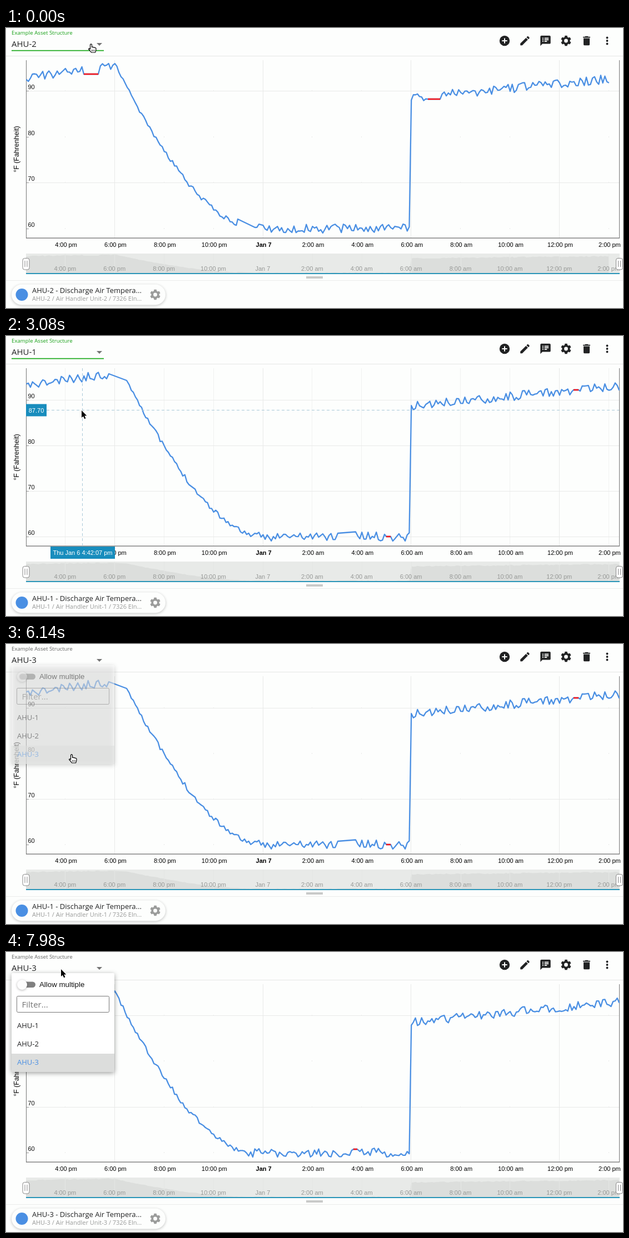
Animation, 1110 px wide and 504 px high, one loop 8000 ms. Source, as an HTML page with a canvas:

```html
<!DOCTYPE html>
<html>
<head>
<meta charset="utf-8">
<style>
html, body { margin: 0; width: 100%; height: 100%; overflow: hidden; background: #fdfefd; }
canvas { display: block; }
</style>
</head>
<body>
<canvas id="stage" width="1110" height="504"></canvas>
<script>
const ctx = document.getElementById('stage').getContext('2d');
const LOOP = 8000, STEP = 90;
const LEFT = 36, RIGHT = 1103, X4PM = 106.3, HOUR = 44.45, MORNING = 727;
const PAPER = '#fdfefd', BLUE = '#4a8fe3', TEAL = '#188dbd', INK = '#212223', GRID = '#e9eae9';
const SANS = 'px "Open Sans", sans-serif', ARIAL = 'px "Liberation Sans", Arial, sans-serif';

// Flats are straight stretches without samples: [x0, x1, y0, y1]; level ones are red
const UNITS = {
  1: { top: 114.5, end: RIGHT, dusk: 213, seed: 11,
    flats: [[185, 217, 68, 80], [597, 629, 355, 352.5], [684, 692, 361, 361], [1021, 1030, 97, 97]] },
  2: { top: 113, end: 1085, dusk: 199, seed: 5,
    flats: [[140, 166, 83, 83], [417, 448, 344, 359], [759, 781, 128, 128]] },
  3: { top: 114, end: RIGHT, dusk: 195, seed: 23,
    flats: [[36.5, 54, 97, 97], [625, 632, 355, 355]] }
};

// Warm day, cool-down after dusk, level night, sudden warm-up in the morning
function trend(x, dusk) {
  if (x >= MORNING) return 126 - 36 * (x - MORNING) / (RIGHT - MORNING);
  if (x < dusk) return Math.max(69, 90 - 22 * (x - LEFT) / 150);
  return 361 - 292 * Math.max(0, 1 - (x - dusk) / 245) ** 1.7;
}

// One sample every five minutes
function buildLine({ end, dusk, seed, flats }) {
  const rand = () => (seed = seed * 16807 % 2147483647) / 2147483647;
  for (let i = 0; i < 9; i++) rand();
  const pts = flats.flatMap(([a, b, y0, y1]) => [[a, y0], [b, y1]]);
  for (let x = LEFT + .5; x <= end + .5; x += HOUR / 12) {
    const noise = (rand() * 2 - 1) * (x > dusk && x < dusk + 240 ? 4.5 : 8);
    if (!flats.some(f => x > f[0] - 2 && x < f[1] + 2)) pts.push([x, trend(x, dusk) + noise]);
  }
  return pts.sort((p, q) => p[0] - q[0]);
}
for (const u of Object.values(UNITS)) u.pts = buildLine(u);

const TICKS = Array.from({ length: 12 }, (_, i) => {
  const h = (16 + i * 2) % 24;
  return {
    x: X4PM + i * 2 * HOUR,
    label: h ? `${h % 12 || 12}:00 ${h < 12 ? 'am' : 'pm'}` : 'Jan 7',
    bold: h ? '' : 'bold ',
    major: i % 3 == 1
  };
});

function rect(x, y, w, h, color) {
  ctx.fillStyle = color;
  ctx.fillRect(x, y, w, h);
}

function text(str, x, y, font, color, align = 'left') {
  ctx.font = font;
  ctx.fillStyle = color;
  ctx.textAlign = align;
  ctx.fillText(str, x, y);
}

function dot(x, y, r, color) {
  ctx.beginPath();
  ctx.arc(x, y, r, 0, 7);
  ctx.fillStyle = color;
  ctx.fill();
}

function pill(x, y, w, h, r, { fill, edge, shadow = 0, shade = .3 }) {
  ctx.save();
  ctx.beginPath();
  ctx.roundRect(x, y, w, h, r);
  ctx.shadowColor = `rgba(0,0,0,${shade})`;
  ctx.shadowBlur = shadow;
  ctx.shadowOffsetY = shadow / 4;
  if (fill) { ctx.fillStyle = fill; ctx.fill(); }
  if (edge) { ctx.strokeStyle = edge; ctx.lineWidth = 1; ctx.stroke(); }
  ctx.restore();
}

function trace(pts) {
  ctx.beginPath();
  for (const [x, y] of pts) ctx.lineTo(x, y);
}

function stroke(pts, color, width) {
  trace(pts);
  ctx.strokeStyle = color;
  ctx.lineWidth = width;
  ctx.stroke();
}

function icon(path, x, y) {
  ctx.save();
  ctx.translate(x - 11, y - 11);
  ctx.scale(.92, .92);
  ctx.fillStyle = INK;
  ctx.fill(new Path2D(path));
  ctx.restore();
}

function gear(x, y, r, color) {
  const pts = [];
  for (let k = 0; k < 6; k++)
    for (const d of [-.36, -.23, .23, .36]) {
      const a = (k / 3 - .5) * Math.PI + d, m = Math.abs(d) > .3 ? r * .76 : r;
      pts.push([x + m * Math.cos(a), y + m * Math.sin(a)]);
    }
  trace(pts);
  ctx.closePath();
  ctx.moveTo(x + r * .36, y);
  ctx.arc(x, y, r * .36, 0, 7);
  ctx.fillStyle = color;
  ctx.fill('evenodd');
}

function drawTools() {
  dot(897, 23, 9.2, INK);
  rect(892.4, 22, 9.2, 2, PAPER);
  rect(896, 18.4, 2, 9.2, PAPER);
  icon('M3 17.2V21H6.8L17.8 9.9L14.1 6.2ZM20.7 7Q21.4 6.3 20.7 5.6L18.4 3.3Q17.7 2.6 17 3.3L15.1 5.1L18.9 8.9Z', 933.5, 23);
  icon('M4 2H20Q22 2 22 4V16Q22 18 20 18H6L2 22V4Q2 2 4 2Z', 970.5, 23);
  for (let i = 0; i < 3; i++) {
    rect(965, 17.5 + i * 2.8, 1.8, 1.8, PAPER);
    rect(968.7, 17.5 + i * 2.8, i < 2 ? 7.4 : 4.6, 1.8, PAPER);
  }
  gear(1007.5, 23, 9.4, INK);
  icon('M6 7H18V19Q18 21 16 21H8Q6 21 6 19ZM5 4H8.5L9.5 3H14.5L15.5 4H19V6H5Z', 1044.5, 23);
  for (const y of [17.5, 23, 28.5]) dot(1081.5, y, 1.9, INK);
}

function drawHeader(unit, open) {
  text('Example Asset Structure', 10, 12, 9.7 + SANS, open ? '#666' : '#18a018');
  text('AHU-' + unit, 10, 34, 15 + SANS, INK);
  trace([[163, 27], [173, 27], [168, 32]]);
  ctx.fillStyle = '#757575';
  ctx.fill();
  if (!open) rect(10, 39.8, 166, 1.7, '#1ca91c');
  rect(0, 50, 1110, 1, '#e6e7e6');
  drawTools();
}

function drawChart(u, hover) {
  const rows = [0, 1, 2, 3].map(i => Math.round(u.top + (361 - u.top) / 3 * i));
  for (const { x, label, bold, major } of TICKS) {
    const gx = Math.round(x - .4);
    if (hover || major) rect(gx, 58, 1, 320, major ? GRID : '#f1f2f1');
    else for (const y of rows) rect(gx, y - 1, 1, 2, GRID);
    text(label, x + 1.7, 394, bold + 11 + ARIAL, '#000', 'center');
  }
  rows.forEach((y, i) => {
    if (hover || i % 2 == 0) rect(37, y, 1066, 1, GRID);
    rect(37, y, 4, 1, '#999');
    text(90 - i * 10, 39.5, y - 3, 11 + ARIAL, '#111');
  });
  rect(LEFT, 58, 1, 320, '#777');
  rect(RIGHT, 58, 1, 320, '#777');
  rect(LEFT, 377.5, 1068, 1.2, '#666');
  ctx.save();
  ctx.translate(22.5, 218);
  ctx.rotate(-Math.PI / 2);
  text('°F (Fahrenheit)', 0, 0, 12.4 + ARIAL, '#000', 'center');
  ctx.restore();

  ctx.lineJoin = 'round';
  stroke(u.pts, BLUE, 2.3);
  for (const [a, b, y0, y1] of u.flats)
    if (y0 == y1) stroke([[a, y0], [b, y1]], '#f5151a', 2.6);
}

function drawNavigator(u) {
  rect(LEFT, 406, 1068, 36, '#e8eae8');
  trace([[LEFT, 442], ...u.pts.map(([x, y]) => [x, 408 + (y - 67) * .112]), [u.end, 442]]);
  ctx.fillStyle = '#dcdedc';
  ctx.fill();
  ctx.save();
  ctx.beginPath();
  ctx.rect(LEFT, 406, 1068, 36);
  ctx.clip();
  for (const { x, label } of TICKS) {
    rect(Math.round(x), 406, 1, 36, '#e4e6e4');
    text(label, x, 437, 11 + ARIAL, '#979997', 'center');
  }
  ctx.restore();
  rect(LEFT, 441, 1068, 2, '#2a95b8');
  for (const x of [LEFT, RIGHT + .5]) {
    pill(x - 6, 414.5, 12, 20.5, 3.5, { fill: '#fff', edge: '#888' });
    rect(x - 2.5, 419, 1, 11, '#888');
    rect(x + 1.5, 419, 1, 11, '#888');
  }
}

function drawFooter(unit) {
  rect(0, 454, 1110, 1, '#ebeceb');
  rect(540, 447, 30, 4, '#c9cac9');
  pill(10, 461.5, 277, 37, 18.5, { fill: PAPER, shadow: 5, shade: .24 });
  dot(28.5, 480, 11, BLUE);
  text(`AHU-${unit} - Discharge Air Tempera...`, 47, 477, 13 + SANS, INK);
  text(`AHU-${unit} / Air Handler Unit-${unit} / 7326 Eln...`, 47, 491, 11 + SANS, '#9a9b9a');
  gear(268.5, 480, 9.5, '#9b9c9b');
}

function drawMenu(alpha, picked) {
  ctx.save();
  ctx.globalAlpha = alpha;
  pill(10, 38, 185, 178, 2, { fill: '#fff', shadow: 8, shade: .38 });
  pill(24, 53.5, 29, 10.5, 5.2, { fill: '#808080' });
  pill(20, 50, 18, 18, 9, { fill: '#fdfdfd', shadow: 4 });
  text('Allow multiple', 60, 63, 13.3 + ARIAL, '#111');
  pill(19.5, 79.5, 166, 29, 2, { edge: '#777' });
  text('Filter...', 28.5, 100, 15 + SANS, '#757575');
  for (let n = 1; n <= 3; n++) {
    const y = 84 + n * 33, on = n == picked;
    if (on) rect(10, y, 185, 33, '#dcdddc');
    text('AHU-' + n, 20, y + 20, 13 + SANS, on ? BLUE : INK);
  }
  ctx.restore();
}

// Crosshair with the value and time under the pointer
function drawCross(px, py) {
  const x = px + 1.5, y = py - .5;
  ctx.save();
  ctx.setLineDash([5, 4]);
  stroke([[x, 58], [x, 378]], '#a9c9d8', 1);
  stroke([[37, y], [RIGHT, y]], '#a9c9d8', 1);
  ctx.restore();
  const seconds = Math.round((x - X4PM) / HOUR * 3600);
  const clock = new Date((4 * 3600 + seconds) * 1000).toISOString().slice(12, 19);
  rect(LEFT, y - 11, 37, 22, TEAL);
  text((90 - (y - 114.5) / 8.26).toFixed(2), 54.5, y + 4.5, 11 + ARIAL, '#fff', 'center');
  rect(x - 57.5, 379, 116, 22, TEAL);
  text(`Thu Jan 6 ${clock} pm`, x + .5, 394, 11 + ARIAL, '#fff', 'center');
}

const ARROW = new Path2D('M0 0V14L3.2 11.2L5.6 16.5L8 15.4L5.7 10.3H10Z');
const HAND = new Path2D('M-1.5 9V1Q0 -1.2 1.5 1V5.5Q3 4.5 4.2 6Q5.6 5 6.6 6.6Q9 6 9 8.5Q9 12 7.5 15H.5Q-2 11.5-4.5 9Q-4 6.6-1.5 9Z');

function drawCursor(x, y, hand) {
  ctx.save();
  ctx.translate(x, y);
  ctx.lineWidth = hand ? 1.2 : 2;
  ctx.strokeStyle = hand ? '#000' : '#fff';
  ctx.fillStyle = hand ? '#fff' : '#000';
  if (hand) {
    ctx.fill(HAND);
    ctx.stroke(HAND);
    for (const k of [1.5, 3.8, 6.1]) rect(k - .4, 10, .8, 3, '#000');
  } else {
    ctx.scale(.93, .93);
    ctx.stroke(ARROW);
    ctx.fill(ARROW);
  }
  ctx.restore();
}

// Times the menu opens and closes, and the unit chosen in it
const VISITS = [
  { open: -LOOP, close: -LOOP / 2, unit: 2 },
  { open: 1320, close: 2710, unit: 1 },
  { open: 4580, close: 6150, unit: 3 },
  { open: 7800, close: 2 * LOOP, unit: 3 }
];

// Pointer glides: start, duration, end point
const GLIDES = [[0, 0, 153, 29], [1670, 620, 136, 134], [3920, 200, 151, 28],
  [4760, 490, 118, 199], [6970, 450, 100, 37], [7560, 0, 99, 31]];

function pointer(t) {
  const i = GLIDES.findLastIndex(g => g[0] <= t);
  const [start, dur, x, y] = GLIDES[i], [, , x0, y0] = GLIDES[Math.max(0, i - 1)];
  const p = Math.min(1, (Math.floor((t - start) / STEP) + 1) / (Math.floor(dur / STEP) + 1));
  const ease = p * p * (3 - 2 * p);
  return [x0 + (x - x0) * ease, y0 + (y - y0) * ease];
}

function menuAlpha(t) {
  const { open, close } = VISITS.findLast(v => v.open <= t);
  const halves = Math.min(Math.floor((t - open) / STEP) + 1, Math.ceil((close - t) / STEP));
  return Math.max(0, Math.min(1, halves / 2));
}

function draw(t) {
  const unitAt = time => VISITS.findLast(v => v.close <= time).unit;
  const [x, y] = pointer(t), menu = menuAlpha(t), open = menu > 0;
  const picked = unitAt(t + 200), shown = unitAt(t), u = UNITS[shown];
  const hover = !open && y > 58;
  rect(0, 0, 1110, 504, PAPER);
  drawChart(u, hover);
  drawNavigator(u);
  drawFooter(shown);
  if (hover && (t >= 3080 && t < 4580 || t >= 7060)) drawCross(x, y);
  drawHeader(picked, open);
  if (open) drawMenu(menu, picked);
  drawCursor(x, y, open ? y > 118 : y < 42);
}

function tick() {
  draw(performance.now() % LOOP);
  requestAnimationFrame(tick);
}
tick();
</script>
</body>
</html>
```
